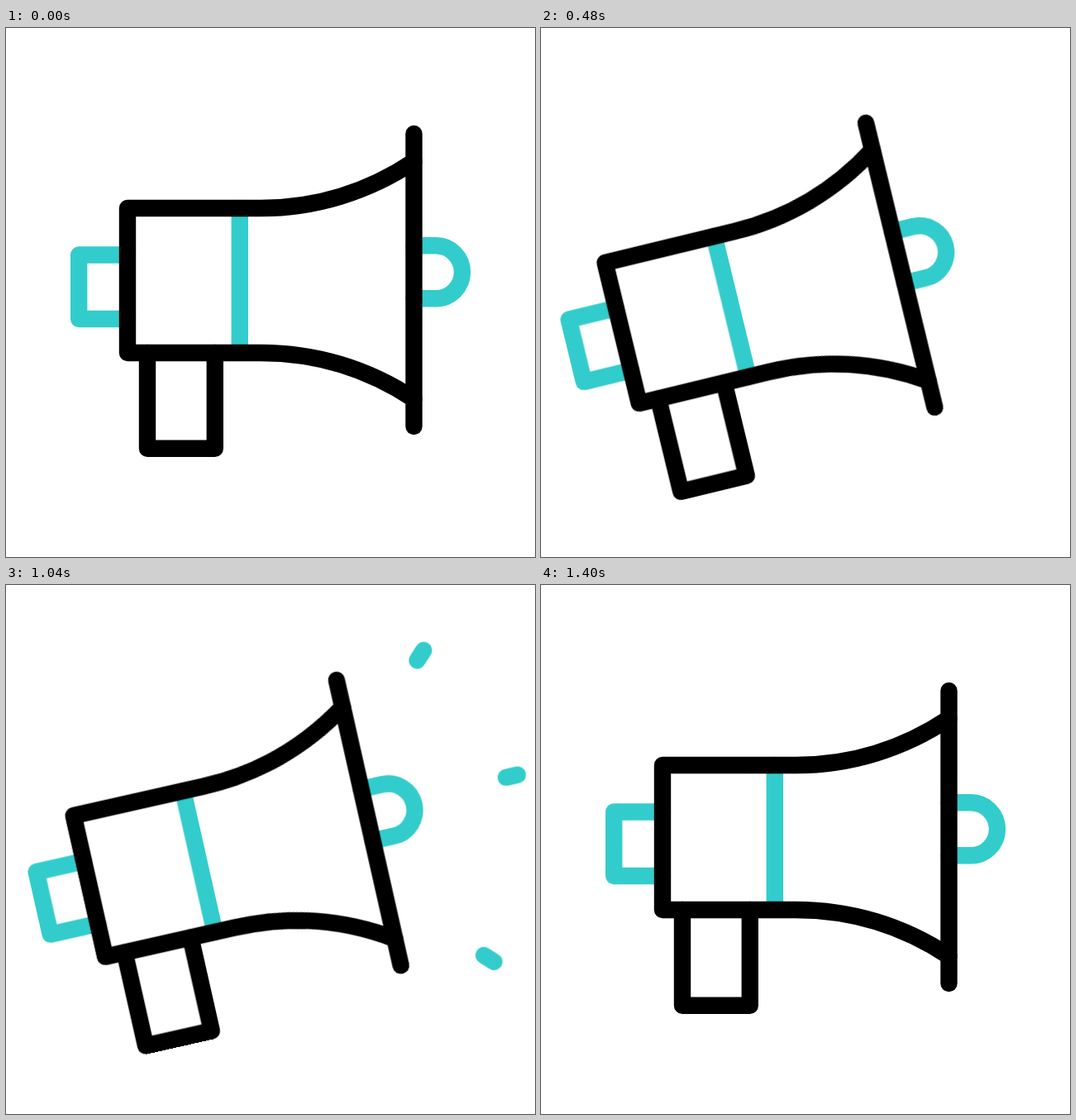
Recreate the animation shown at these times as an HTML page without scripts. Size 640 px wide and 640 px high, loop 1440 ms.

```html
<!DOCTYPE html>
<html lang="en">
<head>
<meta charset="utf-8">
<title>Megaphone</title>
<style>
  html, body { margin: 0; height: 100%; overflow: hidden; background: #fff; }
  svg { display: block; width: 100vw; height: 100vh; }

  .horn {
    fill: none;
    stroke: #000;
    stroke-width: 20.4;
    stroke-linecap: round;
    stroke-linejoin: round;
    transform-origin: 388.5px 542px;
    animation: tilt 1440ms infinite;
  }
  .teal { stroke: #33cccc; }

  .body, .bell, .loop, .rays line { animation: 1440ms infinite; }
  .body { animation-name: body; }
  .bell { animation-name: bell; }
  .loop { animation-name: loop; }
  .rays line { stroke-dasharray: 1 2; animation-name: ray; }

  .horn, .body, .bell, .loop { animation-timing-function: cubic-bezier(.5, 0, .5, 1); }

  @keyframes tilt {
    0%, 6.94% { transform: rotate(0deg); }
    37.5%, 65.1% { transform: rotate(-14deg); }
    95.66%, 100% { transform: rotate(0deg); }
  }

  /* The bell is drawn in, then springs back as the rays shoot out. */
  @keyframes body {
    0%, 37.15%, 64.93%, 100% {
      d: path("M493.5 161.5C438 198.5 374 218 308 218H147V393H308C374 393 438 412 493.5 449");
    }
    50% {
      d: path("M480 170C424.5 207 374 218 308 218H147V393H308C374 393 424.5 403.5 480 440.5");
    }
  }
  @keyframes bell {
    0%, 37.15%, 64.93%, 100% { d: path("M493.5 128V482"); }
    50% { d: path("M480 138.2V471.8"); }
  }
  @keyframes loop {
    0%, 37.15%, 64.93%, 100% { transform: translateX(0); }
    50% { transform: translateX(-13.5px); }
  }

  /* Offset 1 to 0 grows a ray outward, 0 to -1 empties it from the inside. */
  @keyframes ray {
    0%, 51.03% { stroke-dashoffset: 1; visibility: hidden; }
    51.04% { stroke-dashoffset: 1; visibility: visible; animation-timing-function: ease-in-out; }
    64.8% { stroke-dashoffset: 0; visibility: visible; animation-timing-function: linear; }
    74.3% { stroke-dashoffset: -1; visibility: visible; }
    74.31%, 100% { stroke-dashoffset: -1; visibility: hidden; }
  }
</style>
</head>
<body>
<svg viewBox="0 0 640 640">
  <g class="horn">
    <g class="teal">
      <path d="M147 274.5H88.2V352H147"/>
      <path d="M282.8 218V393"/>
      <path class="loop" d="M493.5 263.3H520A32 32 0 0 1 520 327.3H493.5"/>
      <g class="rays">
        <line x1="555" y1="165" x2="604.3" y2="115.9" pathLength="1"/>
        <line x1="614" y1="288" x2="682" y2="288" pathLength="1"/>
        <line x1="555" y1="453" x2="604.6" y2="502.4" pathLength="1"/>
      </g>
    </g>
    <path d="M171 393V508.7H252.8V393"/>
    <path class="body" d="M493.5 161.5C438 198.5 374 218 308 218H147V393H308C374 393 438 412 493.5 449"/>
    <path class="bell" d="M493.5 128V482"/>
  </g>
</svg>
</body>
</html>
```
